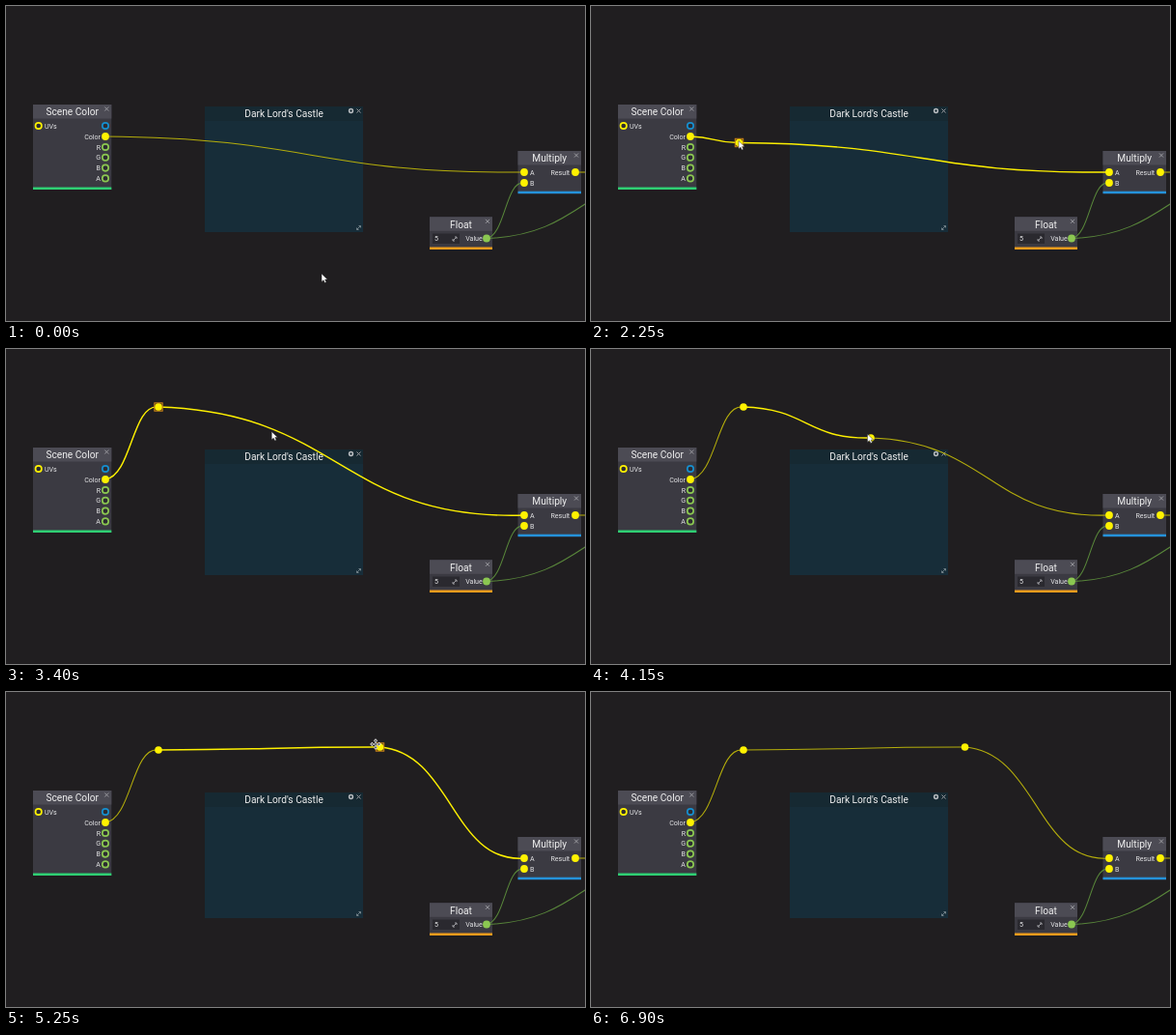
Recreate the animation shown at these times as an HTML page. Size 600x326 px, loop 7 s.

```html
<!DOCTYPE html>
<html lang="en">
<head>
<meta charset="utf-8">
<title>Node graph reroute</title>
<style>
  html, body { margin: 0; width: 100%; height: 100%; overflow: hidden; background: #201e20; }
  svg { display: block; width: 600px; height: 326px; font-family: Roboto, sans-serif; }
  .title { font-size: 10.2px; fill: #f0f0f0; text-anchor: middle; }
  .label { font-size: 7.1px; fill: #e4e4e6; }
  .end { text-anchor: end; }
  .wire { fill: none; stroke: #b4ad0b; stroke-width: 1.05; }
  .wire.bold { stroke: #fdf000; stroke-width: 1.45; }
  .wire.green { stroke: #58863a; }
  .icon { fill: none; stroke: #9b9ba0; stroke-width: 1; }
  .icon.dim { stroke: #6f7f86; }
</style>
</head>
<body>
<svg viewBox="0 0 600 326">
  <g id="panels"></g>
  <g id="wires"></g>
  <g id="ports"></g>
  <g id="knots"></g>
  <g id="arrow"><path d="M0 0V8.4L2 6.7L3.4 9.5L4.9 8.8L3.6 6.1H6.2Z" fill="#fff" stroke="#222" stroke-width=".5"/></g>
  <g id="move"></g>
</svg>
<script>
const LOOP = 7000, STEP = 50;
const YELLOW = '#fff200', GREEN = '#8bc751', BLUE = '#168fcf';
const byId = id => document.getElementById(id);

function add(parent, tag, attrs, text) {
  const el = document.createElementNS('http://www.w3.org/2000/svg', tag);
  for (const key in attrs) el.setAttribute(key, attrs[key]);
  if (text) el.textContent = text;
  return (byId(parent) || parent).appendChild(el);
}

const rect = (x, y, width, height, fill) => add('panels', 'rect', { x, y, width, height, fill });
const icon = (d, cls = 'icon') => add('panels', 'path', { d, class: cls });
const cross = (x, y) => icon(`M${x - 2} ${y - 2}l4 4m0-4l-4 4`);
const resize = (x, y, cls) => icon(`M${x - 2} ${y + 2}l4-4m-2 0h2v2m-4 0v2h2`, cls);
const title = (text, x, y) => add('panels', 'text', { x, y, class: 'title' }, text);
const label = (text, x, y, end) =>
  add('panels', 'text', { x, y: y + 2.5, class: end ? 'label end' : 'label' }, text);

function node(name, x, y, w, h, accent) {
  rect(x, y, w, h, '#3b3a42');
  rect(x, y, w, 14.5, '#4c4b54');
  rect(x, y + h - 2.5, w, 2.5, accent);
  title(name, x + w / 2, y + 11.3);
  cross(x + w - 5, y + 4.5);
}

function port(x, y, color, filled) {
  add('ports', 'circle', {
    cx: x, cy: y, r: filled ? 3.9 : 3.2,
    fill: filled ? color : '#2c2b31', stroke: color, 'stroke-width': filled ? 0 : 1.7
  });
}

rect(206, 104, 164, 130, '#172d39');
rect(206, 104, 164, 15, '#162932');
title("Dark Lord's Castle", 288, 115.4);
add('panels', 'circle', { cx: 357.5, cy: 108.5, r: 1.9, fill: 'none', stroke: '#b8bcc0', 'stroke-width': 1.5 });
cross(365.5, 108.5);
resize(365.5, 229.5, 'icon dim');

node('Scene Color', 28, 102, 81.3, 88, '#2fcf73');
label('UVs', 40, 124);
port(33.7, 124, YELLOW);
port(103, 124, BLUE);
label('Color', 98, 135, true);
port(103, 135, YELLOW, true);
['R', 'G', 'B', 'A'].forEach((name, i) => {
  const y = 146 + i * 10.8;
  label(name, 98, y, true);
  port(103, y, GREEN);
});

node('Multiply', 530.5, 150, 65.5, 44.2, '#2592da');
label('A', 543, 172);
label('B', 543, 183);
label('Result', 584.2, 172, true);
port(537, 172, YELLOW, true);
port(537, 183, YELLOW, true);
port(590, 172, YELLOW, true);

node('Float', 439, 218.3, 65, 33.7, '#f39c1c');
rect(442, 235.5, 28, 10.5, '#2a292f');
label('5', 444, 240.5);
resize(465, 241);
label('Value', 493.8, 240.5, true);
port(498, 240.5, GREEN, true);

// Control points sit half way across and lean 5% of the height along the wire.
function curve([x1, y1], [x2, y2]) {
  const reach = (x2 - x1) * 0.5, lean = (y2 - y1) * 0.05;
  return `M${x1} ${y1}C${x1 + reach} ${y1 + lean} ${x2 - reach} ${y2 + lean} ${x2} ${y2}`;
}

const wire = (cls, d = '') => add('wires', 'path', { d, class: 'wire ' + cls });
wire('green', curve([498, 240.5], [537, 183]));
wire('green', curve([498, 240.5], [706, 172]));
wire('', 'M590 172H600');
const wires = [wire(''), wire(''), wire('')];

function makeKnot() {
  const group = add('knots', 'g', {});
  const frame = add(group, 'rect', { x: -4.2, y: -4.2, width: 8.4, height: 8.4, fill: '#5a4210', stroke: '#c8821a', 'stroke-width': 1 });
  add(group, 'circle', { r: 3.8, fill: YELLOW });
  return { group, frame };
}
const knots = [makeKnot(), makeKnot()];

const fourWay = 'M-4 0H4M0-4V4M-1.5-2.9L0-4.4L1.5-2.9M-1.5 2.9L0 4.4L1.5 2.9M-2.9-1.5L-4.4 0L-2.9 1.5M2.9-1.5L4.4 0L2.9 1.5';
add('move', 'path', { d: fourWay, fill: 'none', stroke: '#fff', 'stroke-width': 2 });
add('move', 'path', { d: fourWay, fill: 'none', stroke: '#222', 'stroke-width': 0.8 });

// Rows of time, x, y; positions ease between rows.
const pointer = [
  [0, 327, 277], [750, 149.5, 137], [1800, 149.5, 137], [1900, 160, 138.5],
  [2050, 153, 139.5], [2250, 153, 139.5], [2650, 157.5, 59], [2950, 157.5, 59],
  [3500, 286.5, 88], [4700, 286.5, 88], [5250, 383, 54], [5550, 383, 54],
  [6000, 355, 38], [6350, 355, 38], [6900, 330, 328], [7000, 330, 328]
];
const firstKnot = [[2250, 153.5, 141.5], [2650, 158, 60]];
const secondKnot = [[4700, 290, 92], [5250, 387.5, 57]];

function at(rows, time) {
  if (time <= rows[0][0]) return rows[0].slice(1);
  const next = rows.findIndex(row => row[0] > time);
  if (next < 0) return rows[rows.length - 1].slice(1);
  const [t0, x0, y0] = rows[next - 1], [t1, x1, y1] = rows[next];
  const u = (time - t0) / (t1 - t0), e = u * u * (3 - 2 * u);
  return [x0 + (x1 - x0) * e, y0 + (y1 - y0) * e];
}

const within = (t, from, to) => t >= from && t < to;
const show = (el, on) => el.setAttribute('visibility', on ? 'visible' : 'hidden');
const place = (el, [x, y]) => el.setAttribute('transform', `translate(${x} ${y})`);

function render(t) {
  const spots = [at(firstKnot, t), at(secondKnot, t)];
  const count = t < 2250 ? 0 : t < 4150 ? 1 : 2;
  const firstOn = within(t, 2250, 3800), secondOn = within(t, 4150, 6000);
  const bold = [firstOn, firstOn || secondOn, within(t, 4250, 6000)];
  const points = [[103, 135], ...spots.slice(0, count), [537, 172]];

  wires.forEach((path, i) => {
    show(path, i <= count);
    if (i <= count) path.setAttribute('d', curve(points[i], points[i + 1]));
    path.classList.toggle('bold', bold[i]);
  });
  knots.forEach((knot, i) => {
    show(knot.group, i < count);
    show(knot.frame, i < count && (i ? within(t, 4400, 6000) : firstOn));
    place(knot.group, spots[i]);
  });

  const dragging = within(t, 2300, 3000) || within(t, 4750, 5600);
  const tip = at(pointer, t);
  place(byId('arrow'), tip);
  place(byId('move'), tip);
  show(byId('arrow'), !dragging);
  show(byId('move'), dragging);
}

const start = performance.now();
function tick() {
  const elapsed = (performance.now() - start) % LOOP;
  render(Math.floor(elapsed / STEP) * STEP);
  requestAnimationFrame(tick);
}
tick();
</script>
</body>
</html>
```
